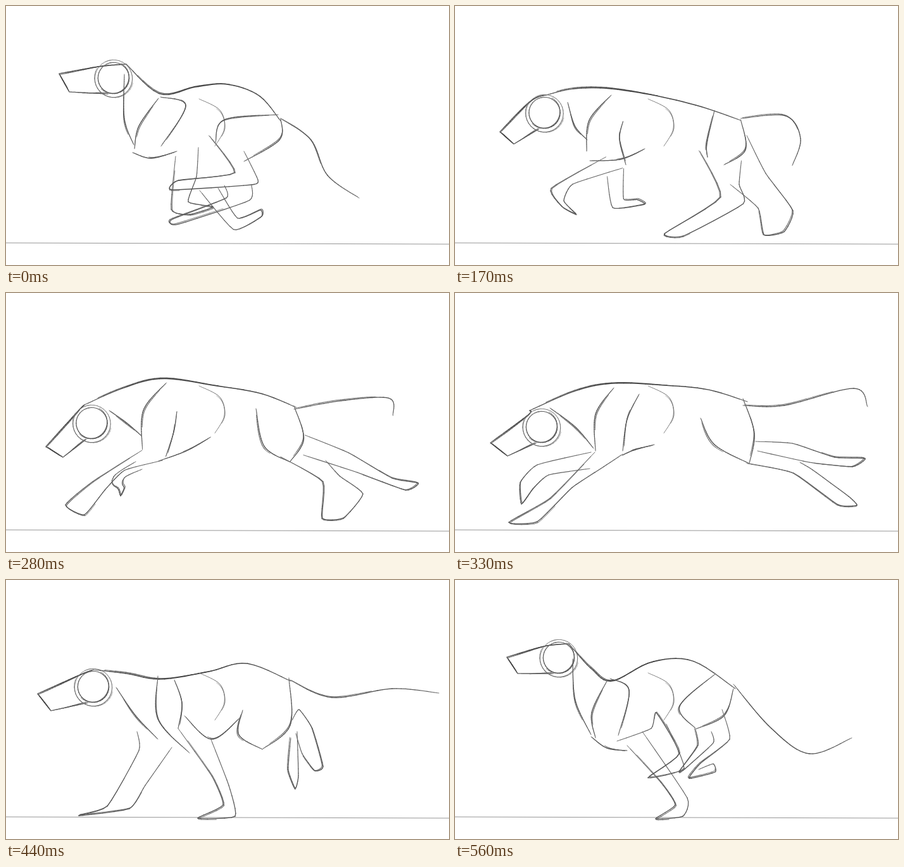
Recreate the animation shown at these times as an HTML page with a canvas. Size 700 px wide and 410 px high, loop 0.62 s.

```html
<!DOCTYPE html>
<html lang="en">
<head>
<meta charset="utf-8">
<title>Running dog sketch</title>
<style>
html, body { margin: 0; width: 100%; height: 100%; overflow: hidden; background: #fff; }
canvas { display: block; }
</style>
</head>
<body>
<canvas id="stage" width="700" height="410"></canvas>
<script>
const SAMPLES = 36, SKULL = 28, LOOP = 620;
const ctx = document.getElementById("stage").getContext("2d");
ctx.lineCap = "round";

// Cardinal spline through flat x, y values; low tension keeps corners crisp
function spline(flat, tension = 0.5) {
  const last = flat.length / 2 - 1;
  const at = (i, axis) => flat[2 * Math.max(0, Math.min(last, i)) + axis];
  return Array.from({ length: SAMPLES + 1 }, (_, k) => {
    const u = k / SAMPLES * last, i = Math.min(last - 1, Math.floor(u)), f = u - i;
    return [0, 1].map(axis => {
      const b = at(i, axis), c = at(i + 1, axis);
      const m = tension * (c - at(i - 1, axis)), n = tension * (at(i + 2, axis) - b);
      return b + f * (m + f * (3 * (c - b) - 2 * m - n + f * (2 * (b - c) + m + n)));
    });
  });
}

function ring(cx, cy, r) {
  return Array.from({ length: SAMPLES + 1 }, (_, k) => {
    const a = -2 + k / SAMPLES * 6.6;
    return [cx + r * Math.cos(a), cy + r * Math.sin(a)];
  });
}

// Every pose yields the same strokes in the same order, so poses can be blended
function pose({ skull: [cx, cy], nose, back, throat, shoulder, belly, haunch, fore, hind, tail }) {
  const stroke = (points, weight = 1) => ({ points, weight });
  const jaw = [cx - SKULL * 0.3, cy + SKULL * 0.9];
  return [
    stroke(spline([...nose.slice(0, 2), cx - SKULL * 0.8, cy - SKULL * 0.65, ...back.slice(0, 2)]), 1.2),
    stroke(spline(nose), 1.2),
    stroke(spline([...nose.slice(2), ...jaw])),
    stroke(ring(cx, cy, SKULL * 0.88)),
    stroke(ring(cx, cy + 1, SKULL * 1.06), 0.7),
    stroke(spline(back), 1.25),
    stroke(spline([305, 147, 338, 165, 345, 194, 330, 222]), 0.6),
    stroke(spline(tail)),
    ...[throat, belly, ...shoulder, ...haunch].map(part => stroke(spline(part))),
    ...[...fore, ...hind].map(leg => stroke(spline(leg, 0.25)))
  ];
}

const gathered = pose({
  skull: [170, 114], nose: [84, 107, 100, 136],
  back: [190, 92, 243, 139, 300, 128, 350, 124, 400, 142, 434, 182],
  throat: [187, 108, 187, 178, 202, 220], belly: [200, 232, 230, 241, 270, 230],
  shoulder: [[241, 146, 210, 190, 203, 226], [244, 144, 284, 158, 245, 222]],
  haunch: [[430, 172, 345, 180, 331, 216], [434, 178, 432, 212, 376, 246]],
  fore: [[268, 238, 261, 322, 290, 330, 327, 318, 288, 310, 301, 270, 304, 224],
    [306, 292, 360, 354, 403, 334, 402, 323, 366, 336, 335, 288]],
  hind: [[322, 206, 362, 264, 272, 276, 262, 291, 388, 283, 398, 275, 376, 230],
    [345, 284, 348, 304, 262, 338, 270, 346, 384, 308, 388, 284]],
  tail: [434, 178, 482, 212, 508, 268, 558, 304]
});

const reaching = pose({
  skull: [149, 138], nose: [72, 149, 89, 175],
  back: [165, 112, 195, 116, 240, 133, 300, 136, 370, 153, 448, 172],
  throat: [180, 115, 187, 180, 208, 217], belly: [208, 215, 235, 235, 268, 236],
  shoulder: [[238, 148, 212, 182, 207, 215], [282, 150, 262, 182, 300, 235]],
  haunch: [[418, 163, 390, 190, 366, 214], [448, 170, 450, 215, 418, 238]],
  fore: [[268, 232, 180, 305, 235, 327, 264, 318, 216, 302, 232, 278, 300, 238],
    [286, 258, 286, 326, 344, 315, 320, 310, 305, 312, 316, 235]],
  hind: [[366, 210, 373, 293, 268, 342, 290, 352, 405, 312, 408, 265, 440, 228],
    [408, 302, 408, 340, 342, 376, 385, 375, 448, 322, 432, 262, 452, 195]],
  tail: [448, 166, 505, 185, 512, 238, 495, 297]
});

const pushing = pose({
  skull: [134, 200], nose: [70, 249, 97, 262],
  back: [130, 168, 180, 146, 243, 128, 330, 147, 405, 165, 455, 190],
  throat: [176, 190, 192, 200, 210, 207], belly: [218, 275, 290, 250, 332, 216],
  shoulder: [[256, 134, 212, 180, 209, 245], [249, 215, 258, 240, 240, 268]],
  haunch: [[402, 168, 406, 245, 432, 265], [455, 190, 468, 240, 432, 265]],
  fore: [[209, 246, 124, 272, 103, 308, 118, 340, 128, 315, 140, 286, 230, 275],
    [195, 282, 213, 313, 255, 313, 256, 303, 228, 299, 217, 280]],
  hind: [[408, 250, 467, 312, 395, 378, 432, 376, 506, 314, 490, 300, 465, 262],
    [462, 263, 550, 300, 635, 349, 655, 340, 620, 326, 550, 268, 470, 215]],
  tail: [455, 190, 540, 163, 580, 182, 571, 208]
});

const stretched = pose({
  skull: [137, 212], nose: [56, 237, 83, 258],
  back: [118, 186, 190, 155, 250, 143, 330, 146, 400, 153, 462, 172],
  throat: [150, 182, 190, 212, 219, 246], belly: [264, 257, 282, 249, 315, 240],
  shoulder: [[251, 150, 222, 192, 222, 250], [291, 160, 272, 200, 265, 250]],
  haunch: [[388, 198, 410, 240, 465, 270], [455, 167, 473, 222, 465, 270]],
  fore: [[221, 252, 150, 325, 85, 363, 130, 362, 185, 308, 235, 275, 265, 255],
    [215, 252, 130, 272, 103, 300, 105, 334, 123, 310, 148, 288, 213, 278]],
  hind: [[462, 270, 535, 285, 605, 335, 635, 336, 622, 322, 565, 280, 545, 268],
    [478, 250, 560, 268, 628, 275, 648, 262, 600, 260, 533, 238, 475, 235]],
  tail: [455, 178, 520, 178, 630, 151, 652, 180]
});

const landing = pose({
  skull: [138, 169], nose: [50, 180, 71, 207],
  back: [138, 142, 190, 148, 245, 157, 320, 145, 380, 132, 450, 160],
  throat: [174, 170, 205, 215, 240, 252], belly: [282, 215, 325, 252, 370, 218],
  shoulder: [[240, 152, 240, 220, 290, 274], [266, 158, 278, 195, 272, 235]],
  haunch: [[374, 206, 368, 245, 405, 268], [447, 155, 449, 230, 405, 268]],
  fore: [[272, 235, 325, 310, 343, 356, 303, 377, 362, 374, 352, 325, 323, 250],
    [207, 240, 210, 270, 160, 358, 115, 373, 195, 362, 220, 325, 262, 265]],
  hind: [[450, 250, 446, 300, 457, 330, 462, 310, 460, 240],
    [458, 243, 468, 275, 488, 302, 501, 295, 484, 235, 463, 205, 452, 222]],
  tail: [448, 158, 515, 186, 610, 172, 684, 179]
});

const passing = pose({
  skull: [150, 143], nose: [63, 128, 75, 163],
  back: [175, 120, 200, 148, 240, 158, 310, 135, 370, 132, 446, 162],
  throat: [174, 150, 192, 215, 240, 260], belly: [225, 245, 255, 257, 300, 255],
  shoulder: [[232, 160, 230, 210, 252, 242], [278, 152, 279, 200, 268, 235]],
  haunch: [[405, 148, 372, 210, 402, 256], [443, 160, 437, 205, 402, 256]],
  fore: [[278, 220, 317, 225, 350, 275, 392, 326, 437, 318, 430, 333, 376, 340, 290, 258],
    [250, 265, 283, 335, 283, 362, 233, 378, 296, 374, 308, 345, 286, 258]],
  hind: [[404, 258, 393, 309, 402, 312, 414, 255, 436, 250, 440, 290],
    [440, 220, 442, 298, 451, 310, 462, 250, 465, 203, 440, 207]],
  tail: [446, 163, 505, 205, 565, 242, 651, 219]
});

const lifting = pose({
  skull: [164, 123], nose: [82, 122, 99, 148],
  back: [180, 101, 215, 140, 248, 160, 310, 130, 375, 128, 443, 172],
  throat: [186, 125, 190, 190, 215, 245], belly: [215, 248, 240, 266, 272, 270],
  shoulder: [[240, 160, 216, 210, 222, 250], [245, 156, 275, 175, 258, 246]],
  haunch: [[412, 148, 355, 200, 380, 235], [440, 172, 425, 215, 380, 236]],
  fore: [[272, 262, 325, 320, 348, 356, 317, 378, 360, 374, 367, 345, 296, 240],
    [256, 255, 310, 235, 318, 210, 354, 275, 305, 313, 362, 298, 334, 228]],
  hind: [[380, 236, 384, 262, 355, 302, 362, 300, 408, 258, 405, 240],
    [422, 205, 434, 252, 388, 290, 370, 314, 411, 304, 408, 291, 385, 300]],
  tail: [440, 165, 500, 235, 560, 275, 627, 250]
});

const between = (a, b) => a.map(({ points, weight }, i) => ({
  weight,
  points: points.map((p, k) => p.map((v, axis) => (v + b[i].points[k][axis]) / 2))
}));

const drawings = [
  gathered, between(gathered, reaching), reaching, between(reaching, pushing), pushing,
  between(pushing, stretched), stretched, between(stretched, landing), landing, passing, lifting
];
const STARTS = [0, 60, 110, 170, 220, 280, 330, 390, 440, 500, 560];

function line(a, b, width, grey) {
  ctx.lineWidth = width;
  ctx.strokeStyle = `rgb(${grey},${grey},${grey})`;
  ctx.beginPath();
  ctx.moveTo(...a);
  ctx.lineTo(...b);
  ctx.stroke();
}

// Pencil pressure fades at both ends
function pencil(points, weight) {
  const count = points.length - 1;
  for (let k = 0; k < count; k++) {
    const press = weight * (0.55 + 0.45 * Math.sqrt(Math.sin(Math.PI * (k + 0.5) / count)));
    line(points[k], points[k + 1], 0.35 + press, Math.round(Math.max(60, 165 - 80 * press)));
  }
}

// A second, shorter pass drifts off the first
function drawStroke({ points, weight }, i) {
  const drift = points.map(([x, y], k) =>
    [x + 1.6 * Math.sin(i * 5 + k / 12), y + 1.6 * Math.cos(i * 3 + k / 10)]);
  const from = i * 7 % 16;
  pencil(drift.slice(from, from + 20), weight * 0.75);
  pencil(points, weight);
}

function frame() {
  const t = performance.now() % LOOP;
  ctx.fillStyle = "#fff";
  ctx.fillRect(0, 0, 700, 410);
  line([0, 375], [700, 377], 1, 150);
  drawings[STARTS.filter(s => s <= t).length - 1].forEach(drawStroke);
  requestAnimationFrame(frame);
}
frame();
</script>
</body>
</html>
```
